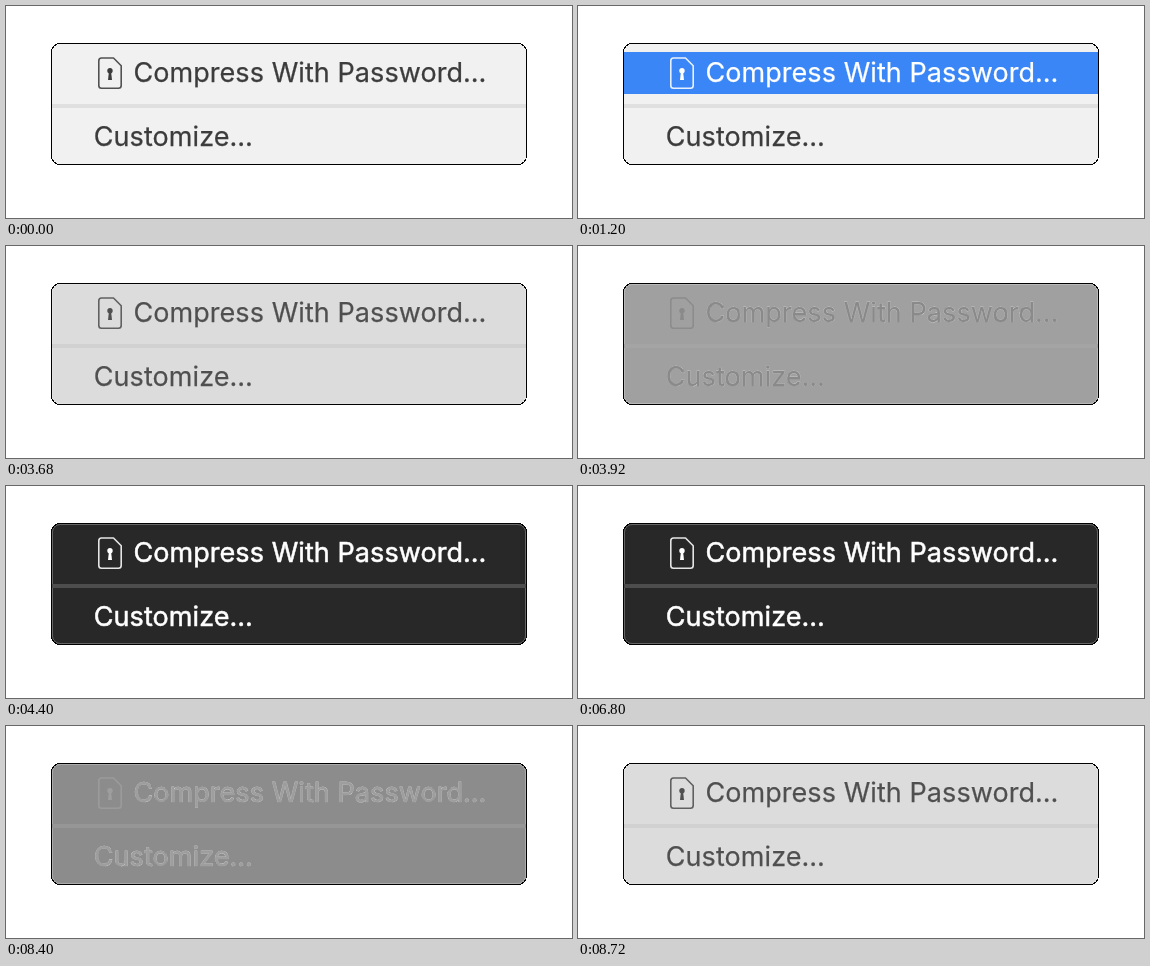
Recreate the animation shown at these times as an HTML page. Size 566 by 212 pixels, loop 8.8 s.

```html
<!DOCTYPE html>
<html lang="en">
<head>
<meta charset="utf-8">
<title>Menu in light and dark mode</title>
<style>
  html, body { margin: 0; width: 100%; height: 100%; overflow: hidden; background: #fff; }
  svg { display: block; width: 566px; height: 212px; }
  text {
    font: 400 27px Inter, "Open Sans", sans-serif;
    letter-spacing: .07px;
    fill: currentColor;
    stroke: currentColor;
  }
  #light { color: #3c3c3c; stroke-width: .25px; }
  #dark { color: #fff; stroke-width: .55px; }
  .selected { color: #fff; }
</style>
</head>
<body>
<svg viewBox="0 0 566 212">
  <defs>
    <clipPath id="panel"><rect x="45.5" y="37.5" width="475" height="121" rx="8.5"/></clipPath>
    <g id="action">
      <path d="M95.5 52H107.5L115.2 59.7V79.5Q115.2 82.3 112.4 82.3H95.5Q92.8 82.3 92.8 79.5V54.8Q92.8 52 95.5 52Z"
            fill="none" stroke="currentColor" stroke-width="1.6" stroke-linejoin="round" opacity=".88"/>
      <circle cx="104" cy="64.8" r="2.7" fill="currentColor"/>
      <path d="M103 65H105L106 74H102Z" fill="currentColor"/>
      <text x="127.4" y="76.2">Compress With Password…</text>
    </g>
    <text id="custom" x="87.8" y="140.2">Customize…</text>
  </defs>
  <g clip-path="url(#panel)">
    <g id="light">
      <rect x="45" y="37" width="476" height="122" fill="#f1f1f1"/>
      <rect x="46" y="98" width="474" height="4" fill="#e0e0e0"/>
      <rect class="hover" x="46" y="46" width="474" height="42" fill="#3a86f7"/>
      <use class="action" href="#action"/>
      <use href="#custom"/>
    </g>
    <g id="dark">
      <rect x="45" y="37" width="476" height="122" fill="#282828"/>
      <rect x="46.5" y="38.5" width="473" height="119" rx="7.5" fill="none" stroke="#666" stroke-width="1"/>
      <rect x="46" y="98" width="474" height="4" fill="#4d4d4d"/>
      <rect class="hover" x="46" y="46" width="474" height="42" fill="#1a63d8"/>
      <use class="action" href="#action"/>
      <use href="#custom"/>
    </g>
  </g>
  <rect x="45.5" y="37.5" width="475" height="121" rx="8.5" fill="none" stroke="#000" shape-rendering="crispEdges"/>
</svg>
<script>
  const LOOP = 8800, STEP = 80, FADE_STEPS = 10;
  const light = document.getElementById("light");
  const dark = document.getElementById("dark");

  // Fades advance in tenths; the first tenth shows at the start time.
  function fade(t, start) {
    const k = Math.floor((t - start) / STEP) + 1;
    return Math.max(0, Math.min(FADE_STEPS, k)) / FADE_STEPS;
  }

  function setHover(layer, on) {
    layer.querySelector(".hover").setAttribute("visibility", on ? "visible" : "hidden");
    layer.querySelector(".action").classList.toggle("selected", on);
  }

  function render(t) {
    dark.setAttribute("opacity", fade(t, 3680) - fade(t, 8080));
    setHover(light, t >= 1200 && t < 2400);
    setHover(dark, t >= 5600 && t < 6800);
  }

  const start = performance.now();
  function tick(now) {
    render(Math.max(0, now - start) % LOOP);
    requestAnimationFrame(tick);
  }
  render(0);
  requestAnimationFrame(tick);
</script>
</body>
</html>
```
